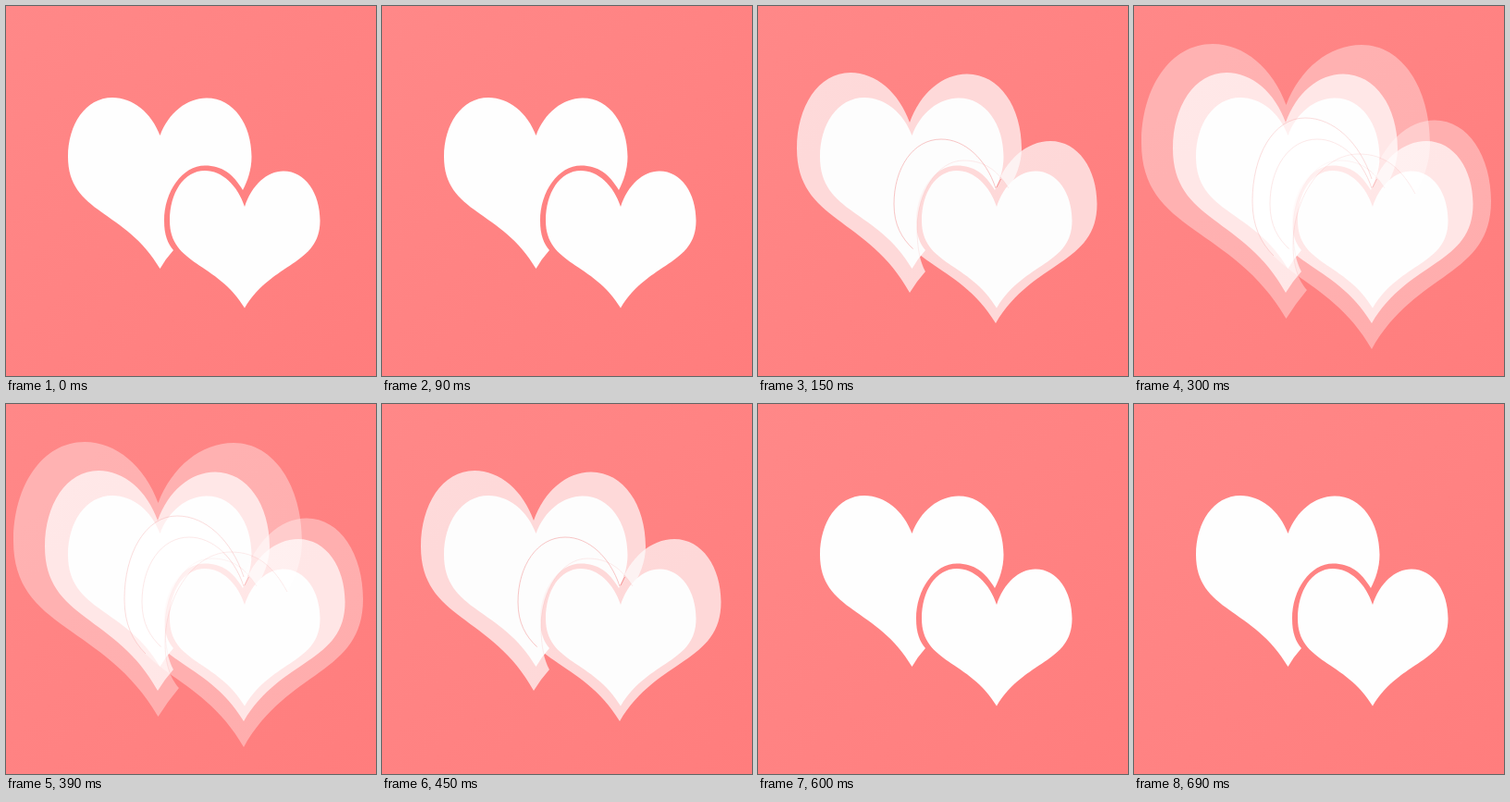
Recreate the animation shown at these times as an HTML page. Size 400 by 400 pixels, loop 750 ms.

```html
<!DOCTYPE html>
<html lang="en">
<head>
<meta charset="utf-8">
<title>Beating hearts</title>
<style>
html, body { margin: 0; width: 100%; height: 100%; overflow: hidden; }
body { background: linear-gradient(135deg, #ff8888, #ff7d7d); }
svg { display: block; width: 100%; height: 100%; }
</style>
</head>
<body>
<svg id="stage" viewBox="0 0 400 400"></svg>
<script>
const STEP = 150;
const LEVELS = [0, 1, 2, 1, 0];
const stage = document.getElementById('stage');

// Each layer: a back heart with a bite taken out of it and a whole front heart.
const layers = [
  {
    alpha: 1,
    back: { cx: 166.5, notch: 140, tip: 284, side: 163, left: [67, 115, 99], right: [265.5, 217, 99.5] },
    bite: { corner: [256, 199], top: [215, 172.5], left: [171, 232], end: [181, 264] },
    front: { cx: 258, notch: 217, tip: 326.5, side: 232, left: [177, 215, 178], right: [339.5, 300, 178.5] }
  },
  {
    alpha: 0.7,
    back: { cx: 164, notch: 126, tip: 310, side: 154, left: [42, 100, 72], right: [285, 226, 73.5] },
    bite: { corner: [271, 197], top: [222, 167], left: [172, 240], end: [181, 287] },
    front: { cx: 257, notch: 197, tip: 343, side: 214, left: [147, 198, 144], right: [366.5, 316, 146] }
  },
  {
    alpha: 0.36,
    back: { cx: 164.5, notch: 107, tip: 338, side: 148, left: [8, 85, 41], right: [320, 246, 42] },
    bite: { corner: [304, 203], top: [243, 160], left: [172, 258], end: [187, 307] },
    front: { cx: 257, notch: 187, tip: 371, side: 211, left: [128, 185, 121], right: [386, 325, 123.5] }
  }
];

const curve = (...n) => 'C' + n.map(v => v.toFixed(2)).join(' ');

// Notch over the lobe to the widest point.
function lobe(h, [edge, x, y]) {
  const d = h.cx - x, rise = h.notch - y;
  return curve(h.cx - 0.18 * d, h.notch - 0.6 * rise, x + 0.43 * d, y, x, y) +
    curve(x + 0.6 * (edge - x), y, edge, y + 0.45 * (h.side - y), edge, h.side);
}

// Widest point down to the tip.
function flank(h, [edge]) {
  const w = h.cx - edge, drop = h.tip - h.side;
  return curve(edge, h.side + 0.51 * drop, edge + 0.63 * w, h.side + 0.47 * drop, h.cx, h.tip);
}

const start = h => `M${h.cx} ${h.notch}`;
const half = (h, s) => start(h) + lobe(h, s) + flank(h, s);
const heart = h => half(h, h.left) + 'L' + h.cx + ' ' + h.notch + lobe(h, h.right) + flank(h, h.right) + 'Z';

function biteEdge({ corner: [ax, ay], top: [bx, by], left: [cx, cy], end: [dx, dy] }) {
  return curve(ax - 0.25 * (ax - bx), ay - 0.65 * (ay - by), bx + 0.46 * (ax - bx), by, bx, by) +
    curve(bx - 0.55 * (bx - cx), by, cx, cy - 0.53 * (cy - by), cx, cy) +
    curve(cx, cy + 0.5 * (dy - cy), cx + 0.4 * (dx - cx), cy + 0.78 * (dy - cy), dx, dy);
}

function bittenHeart(h, bite) {
  const [x, y] = bite.corner, [ex, ey] = bite.end, edge = h.right[0];
  const drop = y - h.side;
  return start(h) + lobe(h, h.right) +
    curve(edge, h.side + 0.4 * drop, x + 0.5 * (edge - x), h.side + 0.75 * drop, x, y) +
    biteEdge(bite) +
    `Q${(ex + h.cx) / 2 - 1} ${(ey + h.tip) / 2 - 1} ${h.cx} ${h.tip}` +
    start(h) + lobe(h, h.left) + flank(h, h.left) + `L${h.cx} ${h.notch}Z`;
}

function add(parent, tag, attrs) {
  const el = document.createElementNS('http://www.w3.org/2000/svg', tag);
  for (const key in attrs) el.setAttribute(key, attrs[key]);
  return parent.appendChild(el);
}

function seam(parent, d, opacity, dash) {
  add(parent, 'path', {
    d, fill: 'none', stroke: '#ef7878', 'stroke-opacity': opacity,
    pathLength: 100, 'stroke-dasharray': dash + ' 200'
  });
}

const groups = layers.map(({ alpha, back, bite, front }, i) => {
  const g = add(stage, 'g', {});
  const fill = { fill: '#fefefe', 'fill-opacity': alpha };
  add(g, 'path', { d: bittenHeart(back, bite), ...fill });
  add(g, 'path', { d: heart(front), ...fill });
  if (i) {
    seam(g, half(front, front.left), i === 1 ? 0.42 : 0.25, 66);
    seam(g, 'M' + bite.corner.join(' ') + biteEdge(bite), 0.14, 100);
  }
  if (i === 1) seam(g, 'M258 196L262.5 187', 0.7, 100);
  return g;
});

function draw(time) {
  const level = LEVELS[Math.floor(time / STEP) % LEVELS.length];
  groups.forEach((g, i) => g.setAttribute('visibility', i <= level ? 'visible' : 'hidden'));
}

const begin = performance.now();
function tick() {
  draw(performance.now() - begin);
  requestAnimationFrame(tick);
}
tick();
</script>
</body>
</html>
```
